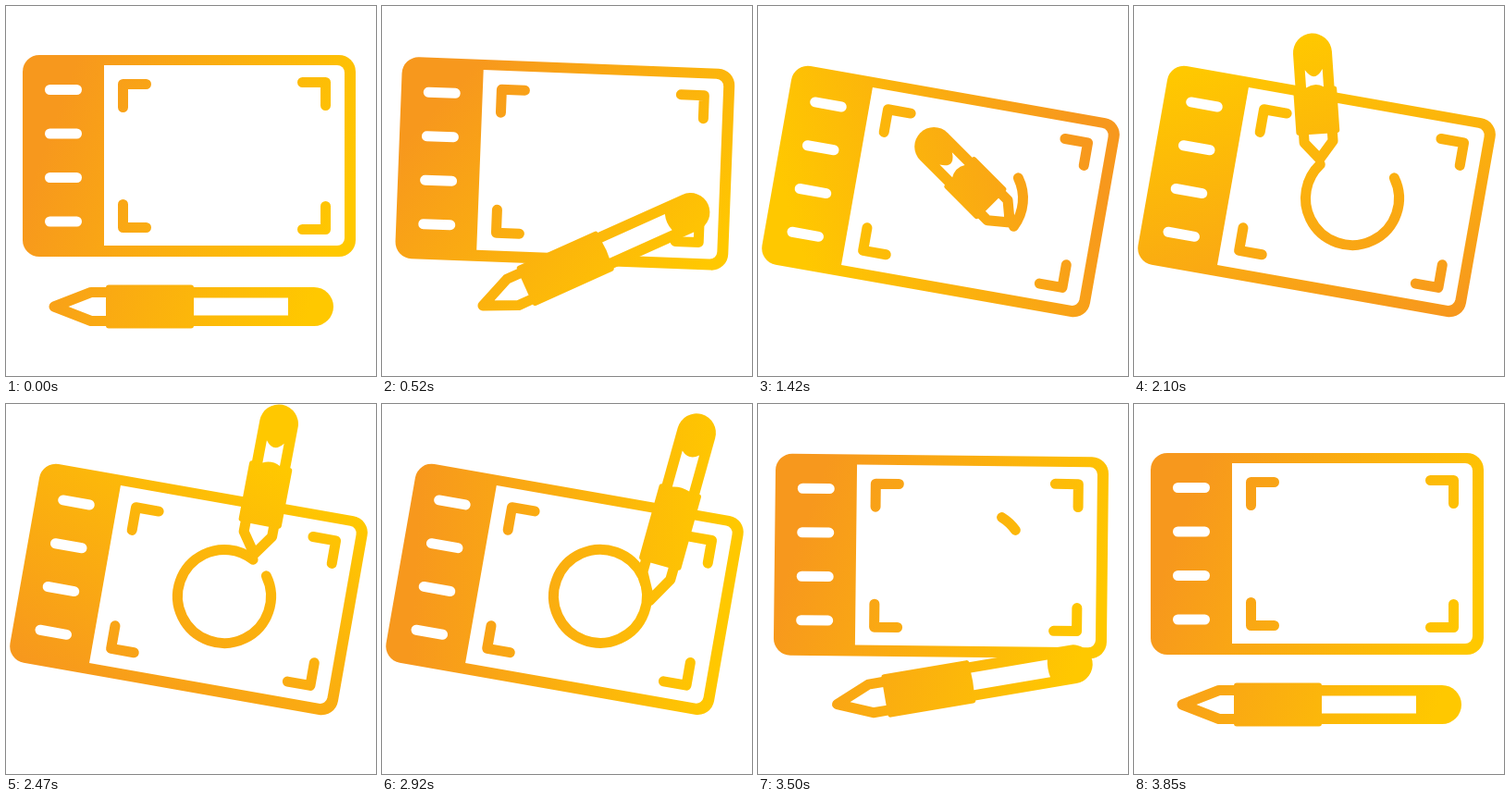
Write an HTML page with a canvas that moves like this. It is 400 by 400 pixels and loops after 3870 ms.

```html
<!DOCTYPE html>
<html lang="en">
<head>
<meta charset="utf-8">
<title>Drawing tablet</title>
<style>
  html, body { margin: 0; height: 100%; overflow: hidden; background: #fff; }
  canvas { display: block; width: 100vmin; height: 100vmin; }
</style>
</head>
<body>
<canvas width="400" height="400"></canvas>
<script>
const canvas = document.querySelector('canvas');
const ctx = canvas.getContext('2d');
const LOOP = 3870;
const DEG = Math.PI / 180;
const RING = { x: 237.2, y: 162.7, r: 50.5, start: -36 * DEG };

// Rows: time, angle from tip to cap, visible length
const pose = [
  [350, 0, 308], [625, -50, 245], [800, -109, 220], [900, -118, 180],
  [1420, -135, 143], [1750, -122, 140], [2100, -94, 142], [2520, -78, 174],
  [2800, -77, 190], [2920, -74.5, 215], [3250, -32.8, 238], [3600, -3, 302], [3820, 0, 308]
];
// Rows: time, x, y of the pen tip
const tipIn = [[350, 46, 325], [625, 160, 312], [800, 269, 210], [900, 281, 186]];
const tipOut = [[2800, 281, 186], [2920, 288, 218], [3250, 166, 319], [3600, 54, 324], [3820, 46, 325]];

const ease = (t, from, to) => {
  const u = Math.min(1, Math.max(0, (t - from) / (to - from)));
  return (1 - Math.cos(Math.PI * u)) / 2;
};

// Smooth curve through the rows, at rest at both ends
function track(rows, t) {
  const last = rows.length - 1;
  if (t <= rows[0][0]) return rows[0].slice(1);
  if (t >= rows[last][0]) return rows[last].slice(1);
  const i = rows.findIndex(row => row[0] > t) - 1;
  const a = rows[i], b = rows[i + 1], h = b[0] - a[0], u = (t - a[0]) / h;
  const slope = (k, c) => k === 0 || k === last ? 0 :
    (rows[k + 1][c] - rows[k - 1][c]) / (rows[k + 1][0] - rows[k - 1][0]);
  return [1, 2].map(c =>
    a[c] + (b[c] - a[c]) * u * u * (3 - 2 * u) +
    h * u * (1 - u) * (slope(i, c) * (1 - u) - slope(i + 1, c) * u));
}

function erase(draw) {
  ctx.globalCompositeOperation = 'destination-out';
  draw();
  ctx.globalCompositeOperation = 'source-over';
}

function box(x, y, w, h, r) {
  ctx.beginPath();
  ctx.roundRect(x, y, w, h, r);
  ctx.fill();
}

function line(...points) {
  ctx.beginPath();
  points.forEach(p => ctx.lineTo(...p));
  ctx.stroke();
}

function drawTablet(turn, drawn, erased) {
  ctx.save();
  ctx.translate(198 - 0.5 * turn, 162 + 38.5 * turn);
  ctx.rotate(10 * DEG * turn);
  ctx.translate(-198, -162);
  box(18, 53, 360, 218, 18);
  erase(() => {
    box(106, 64, 260, 195, [0, 8, 8, 0]);
    for (let i = 0; i < 4; i++) box(42, 85 + 47.5 * i, 40, 11, 5.5);
  });
  line([126.5, 109.5], [126.5, 84.5], [151.5, 84.5]);
  line([320.5, 82.5], [345.5, 82.5], [345.5, 107.5]);
  line([345.5, 216.5], [345.5, 241.5], [320.5, 241.5]);
  line([126.5, 214.5], [126.5, 239.5], [151.5, 239.5]);
  if (drawn > erased) {
    ctx.beginPath();
    ctx.arc(RING.x, RING.y, RING.r,
      RING.start + erased * 2 * Math.PI, RING.start + drawn * 2 * Math.PI);
    ctx.stroke();
  }
  ctx.restore();
}

function drawPen([x, y], [angle, length]) {
  const capX = length - 21;
  const tilt = 1 - capX / 287;
  const nib = 62 - 50 * tilt;
  const grip = 157 - 20 * tilt - 185 * tilt * tilt;
  const edge = 259 - 270 * tilt;

  ctx.save();
  ctx.translate(x, y);
  ctx.rotate(angle * DEG);

  const nibShape = [[nib + 2, -15.5], [nib * 0.74, -15.5], [6, 0], [nib * 0.74, 15.5], [nib + 2, 15.5]];
  ctx.beginPath();
  nibShape.forEach(p => ctx.lineTo(...p));
  erase(() => ctx.fill());
  line(...nibShape);

  ctx.beginPath();
  ctx.moveTo(grip - 2, -21);
  ctx.arc(capX, 0, 21, -Math.PI / 2, Math.PI / 2);
  ctx.lineTo(grip - 2, 21);
  ctx.fill();
  box(nib, -23.5, grip - nib, 47, 3);

  // Window, with edges that curve as the pen tips toward the viewer
  ctx.beginPath();
  ctx.moveTo(grip, -9.5);
  ctx.lineTo(edge, -9.5);
  ctx.quadraticCurveTo(edge - 26 * tilt, 0, edge, 9.5);
  ctx.lineTo(grip, 9.5);
  ctx.quadraticCurveTo(grip + 10 * tilt, 0, grip, -9.5);
  erase(() => ctx.fill());
  ctx.restore();
}

function tint(t) {
  const spin = Math.min(1, Math.max(0, (t - 350) / 2700));
  const a = (20 + 360 * spin) * DEG;
  const dx = 165 * Math.cos(a), dy = 165 * Math.sin(a);
  const gradient = ctx.createLinearGradient(200 - dx, 200 - dy, 200 + dx, 200 + dy);
  gradient.addColorStop(0, '#f7981d');
  gradient.addColorStop(1, '#ffc800');
  ctx.globalCompositeOperation = 'source-in';
  ctx.fillStyle = gradient;
  ctx.fillRect(0, 0, 400, 400);
}

function penTip(t, drawn) {
  if (t < 900) return track(tipIn, t);
  if (t > 2800) return track(tipOut, t);
  const a = -26 * DEG + drawn * 2 * Math.PI;
  return [236 + RING.r * Math.cos(a), 208 + RING.r * Math.sin(a)];
}

function frame() {
  const t = performance.now() % LOOP;
  const drawn = ease(t, 900, 2800);
  const back = ease(t, 2890, 3620);

  ctx.globalCompositeOperation = 'source-over';
  ctx.clearRect(0, 0, 400, 400);
  ctx.fillStyle = ctx.strokeStyle = '#000';
  ctx.lineWidth = 11;
  ctx.lineCap = ctx.lineJoin = 'round';

  drawTablet(ease(t, 350, 900) - back, drawn, back);
  drawPen(penTip(t, drawn), track(pose, t));
  tint(t);
  requestAnimationFrame(frame);
}
frame();
</script>
</body>
</html>
```
